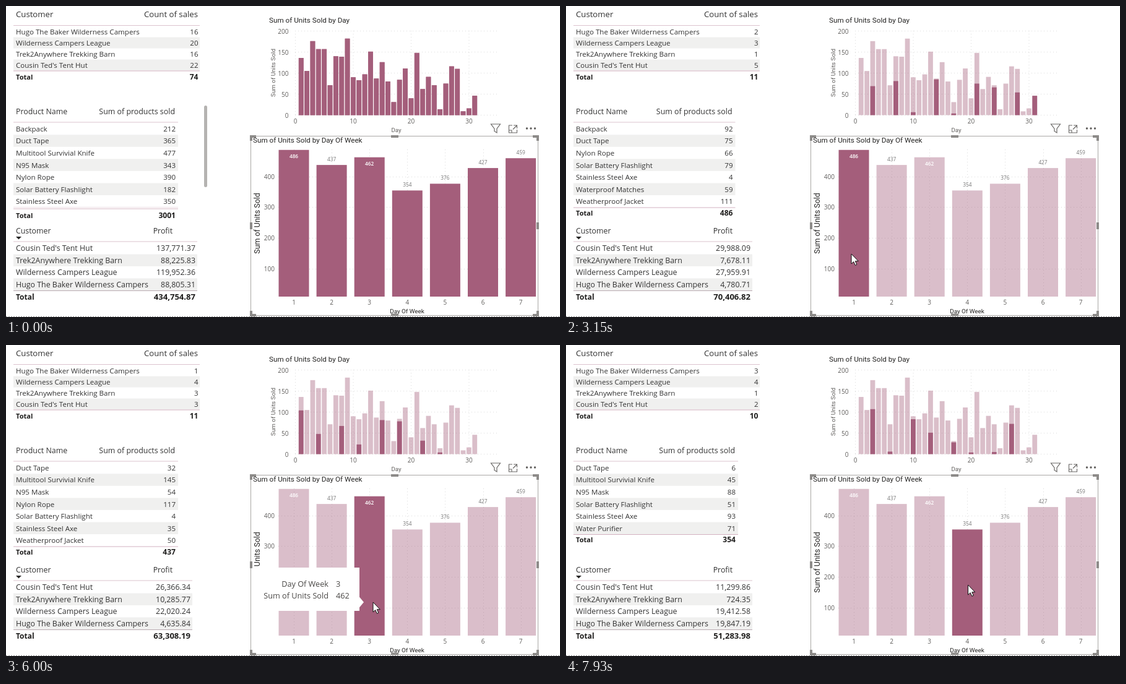
Write an HTML page that moves like this. It is 895 px wide and 503 px high and loops after 8000 ms.

```html
<!DOCTYPE html>
<html lang="en">
<head>
<meta charset="utf-8">
<title>Sales dashboard</title>
<style>
html, body { margin: 0; width: 100%; height: 100%; overflow: hidden; background: #fff; }
svg { display: block; width: 895px; height: 503px; }
text { font-family: "Open Sans", "Noto Sans", sans-serif; fill: #333; white-space: pre; }
.din { font-family: Roboto, Inter, sans-serif; fill: #252423; }
</style>
</head>
<body>
<svg id="stage" viewBox="0 0 895 503"></svg>
<script>
const LOOP = 8000;
const ACCENT = '#a45e7b', GREY = '#8d8b89';
const stage = document.getElementById('stage');

function el(tag, attrs, parent = stage) {
  const node = document.createElementNS('http://www.w3.org/2000/svg', tag);
  for (const key in attrs) node.setAttribute(key, attrs[key]);
  parent.appendChild(node);
  return node;
}
const text = (str, x, y, size, attrs = {}, parent = stage) => {
  const node = el('text', { x, y, 'font-size': size, ...attrs }, parent);
  node.textContent = str;
  return node;
};
const rect = (x, y, width, height, fill, parent, more) =>
  el('rect', { x, y, width, height, fill, ...more }, parent);
const path = (d, attrs, parent) => el('path', { d, fill: 'none', ...attrs }, parent);
const show = (node, on) => node.setAttribute('display', on ? 'inline' : 'none');
const clamp = v => Math.max(0, Math.min(1, v));
const ease = p => p < .5 ? 4 * p ** 3 : 1 - 4 * (1 - p) ** 3;
const END = { 'text-anchor': 'end' }, MID = { 'text-anchor': 'middle' };

// Data: index 0 is the unfiltered view, 1 to 4 the selected weekday
const shops = ['Hugo The Baker Wilderness Campers', 'Wilderness Campers League',
  'Trek2Anywhere Trekking Barn', "Cousin Ted's Tent Hut"];
const sales = [[16, 20, 16, 22, 74], [2, 3, 1, 5, 11], [1, 4, 3, 3, 11], [4, 1, 2, 3, 10], [3, 4, 1, 2, 10]];
const profits = [
  '137,771.37 88,225.83 119,952.36 88,805.31 434,754.87',
  '29,988.09 7,678.11 27,959.91 4,780.71 70,406.82',
  '26,366.34 10,285.77 22,020.24 4,635.84 63,308.19',
  '18,688.23 17,819.01 6,084.54 24,338.16 66,929.94',
  '11,299.86 724.35 19,412.58 19,847.19 51,283.98'
].map(row => row.split(' '));
const goods = {
  B: 'Backpack', D: 'Duct Tape', M: 'Multitool Survivial Knife', N: 'N95 Mask', R: 'Nylon Rope',
  S: 'Solar Battery Flashlight', A: 'Stainless Steel Axe', W: 'Waterproof Matches',
  J: 'Weatherproof Jacket', P: 'Water Purifier'
};
const sold = [
  { B: 212, D: 365, M: 477, N: 343, R: 390, S: 182, A: 350 },
  { B: 92, D: 75, R: 66, S: 79, A: 4, W: 59, J: 111 },
  { D: 32, M: 145, N: 54, R: 117, S: 4, A: 35, J: 50 },
  { B: 61, D: 134, M: 54, N: 70, R: 5, A: 68, P: 70 },
  { D: 6, M: 45, N: 88, S: 51, A: 93, P: 71 }
];
const totals = [3001, 486, 437, 462, 354];
const daily = [136, 105, 176, 157, 157, 71, 140, 139, 182, 90, 83, 97, 151, 87, 126, 80,
  31, 84, 111, 40, 148, 62, 91, 71, 14, 75, 116, 110, 9, 16, 46];
const shares = [
  Object.fromEntries(daily.map((v, i) => [i + 1, v])),
  { 3: 69, 7: 81, 10: 7, 14: 85, 17: 4, 21: 75, 24: 66, 28: 54, 31: 46 },
  { 1: 104, 4: 48, 8: 67, 11: 23, 15: 81, 18: 78, 22: 32, 25: 4 },
  { 2: 37, 5: 70, 9: 115, 12: 56, 16: 67, 19: 70, 23: 42, 26: 5 },
  { 3: 107, 6: 6, 10: 83, 13: 51, 17: 28, 20: 4, 24: 5, 27: 72 }
];
const weekly = [486, 437, 462, 354, 376, 427, 459];

// When each part follows a click
const barTimes = [2300, 4250, 5930, 7515];
const chartTimes = [2570, 4343, 6060, 7635];
const goodsTimes = [2640, 4370, 6130, 7725];
const shopTimes = [2710, 4510, 6200, 7790];
const MORPH = 300;
const stateAt = (times, t) => times.filter(at => t >= at).length;

// Tables
function table(o) {
  const g = el('g', {});
  const n = o.rows.length, foot = o.foot || o.top + n * o.pitch;
  const line = (y, color) => rect(12, y, o.edge - 12, 1, color, g);
  text(o.head[0], 16, o.headY, o.headSize, {}, g);
  text(o.head[1], o.headX, o.headY, o.headSize, END, g);
  o.rows.forEach(([name, value], i) => {
    const y = o.top + i * o.pitch;
    if (i % 2) rect(12, y, o.edge - 12, o.pitch, '#f0f0ef', g);
    text(name, 16, y + o.base, o.size, {}, g);
    text(value, o.right, y + o.base, o.size, END, g);
  });
  line(o.lineY, '#dcc3ce');
  line(foot, o.footColor || '#d3b1c0');
  const bold = { 'font-weight': 700, style: 'fill:#1f1e1d' };
  text('Total', 16, foot + o.totalDy, o.totalSize, bold, g);
  text(o.total, o.right, foot + o.totalDy, o.totalSize * 1.09, { ...bold, ...END }, g);
  return g;
}
const salesTables = sales.map(v => table({
  head: ['Customer', 'Count of sales'], headX: 310, headY: 18, headSize: 13.2, lineY: 31,
  top: 32.5, pitch: 18, base: 13.5, size: 11.57, edge: 313, right: 310.5,
  rows: shops.map((s, i) => [s, v[i]]), total: v[4], totalDy: 14, totalSize: 11.1
}));
const goodsTables = sold.map((list, k) => {
  const shift = k === 1 ? 4.5 : 0;
  const g = table({
    head: ['Product Name', 'Sum of products sold'], headX: 273 - shift, headY: 175, headSize: 12.4, lineY: 187.5,
    top: 188.7, pitch: 19.55, base: 14.2, size: 11.57, edge: 278 - shift, right: 274 - shift,
    rows: Object.entries(list).map(([id, v]) => [goods[id], v]),
    total: totals[k], totalDy: k ? 13 : 15.5, totalSize: 11.1, foot: k ? 0 : 327.5
  });
  if (!k) {
    rect(12, 324.5, 266, 3, '#f6eff2', g);
    rect(320, 161, 5, 132, '#b5b3b1', g, { rx: 2.5 });
  }
  return g;
});
const profitTables = profits.map((v, k) => table({
  head: ['Customer', 'Profit'], headX: 269, headY: 368, headSize: 12.35, lineY: 380.5,
  top: 382, pitch: 19.5, base: 14, size: 12.4, edge: k ? 301 : 309, right: k ? 298 : 306,
  rows: [3, 2, 1, 0].map((s, i) => [shops[s], v[i]]),
  total: v[4], totalDy: 15, totalSize: 12, footColor: '#b9aab1'
}));
path('M16 373h9l-4.500 4.500z', { fill: '#252423' });

// Daily chart
const DOT = { stroke: '#dadada', 'stroke-dasharray': '1 4' };
const soft = 'fill:#605e5c';
const dayX = d => 467.5 + 9.35 * d, dayY = v => 176.500 - .68 * v;
text('Sum of Units Sold by Day', 425, 27, 11.7, { class: 'din' });
for (let v = 0; v <= 200; v += 50) {
  path(`M467 ${dayY(v)}H797`, DOT);
  text(v, 456.5, dayY(v) + 4, 10, { ...END, style: soft });
}
for (let d = 0; d <= 30; d += 10) {
  path(`M${dayX(d)} 40V176`, DOT);
  text(d, dayX(d), 190, 10, { ...MID, style: soft });
}
text('Sum of Units Sold', 0, 0, 9.8, { class: 'din', ...MID, style: soft, transform: 'translate(434.500 108) rotate(-90)' });
text('Day', 630.5, 204, 9.7, { class: 'din', ...MID, style: soft });
const dayBase = el('g', { fill: ACCENT });
daily.forEach((v, i) => el('rect', { x: dayX(i + 1) - 4, y: dayY(v), width: 7.8, height: .68 * v }, dayBase));
const dayBars = daily.map((v, i) => rect(dayX(i + 1) - 4, 0, 7.8, 0, ACCENT));

// Weekday chart
const weekX = i => 465 + 61.1 * i, weekY = v => 474.3 - .497 * v;
text('Sum of Units Sold by Day Of Week', 399, 221, 11.7, { class: 'din' });
for (let v = 100; v <= 400; v += 100) {
  path(`M440 ${Math.round(weekY(v)) + .5}H856`, DOT);
  text(v, 434, weekY(v) + 4, 10, { ...END, style: soft });
}
text('Sum of Units Sold', 0, 0, 12.4, { class: 'din', ...MID, transform: 'translate(410 351.500) rotate(-90)' });
text('Day Of Week', 648, 497, 9.9, { class: 'din', ...MID });
const weekBars = weekly.map((v, i) => {
  const x = weekX(i), y = weekY(v), inside = i === 0 || i === 2;
  path(`M${Math.round(x) + .5} 232V470`, DOT);
  const bar = rect(x - 24.5, y, 49, 470 - y, ACCENT);
  text(v, x, y + (inside ? 13 : -6), 8.3,
    { ...MID, 'font-weight': inside ? 600 : 400, style: `fill:${inside ? '#fff' : '#777'}` });
  text(i + 1, x, 483, 10, { ...MID, style: soft });
  return bar;
});

// Selection frame, toolbar icons, page edge
path('M0 502.500H895', { stroke: '#8a8a8a', 'stroke-dasharray': '2 2' });
rect(395.5, 210.5, 464, 290, 'none', stage, { stroke: '#a9a7a5' });
path('M396 218V211H404M851 211H859V218M859 493V500H851M404 500H396V493' +
  'M622 211H634M622 499.500H634M396 350V361M859 350V361', { stroke: GREY, 'stroke-width': 4 });
path('M783.500 191H798.500L793 198.500V205L789 202.500V198.500Z', { stroke: '#696765', 'stroke-width': 1.2 });
path('M818 193H812.500V205H825.500V200M820 193H825.500V198M825.500 193L819 199.500M812.500 201H817V205',
  { stroke: '#696765', 'stroke-width': 1.1 });
[841.5, 848, 854.5].forEach(cx => el('circle', { cx, cy: 198, r: 1.7, fill: '#605e5c' }));

// Tooltips: position, side of the arrow, visible span
const tips = [
  { x: 487, y: 344, side: -1, from: 2110, to: 2790 },
  { x: 331, y: 362, side: 1, from: 4110, to: 4800 },
  { x: 400, y: 360, side: 1, from: 5800, to: 6520 }
];
tips.forEach((tip, i) => {
  const g = tip.node = el('g', { transform: `translate(${tip.x} ${tip.y})` });
  rect(0, 0, 171, 70, '#fff', g);
  path(tip.side < 0 ? 'M.5 48L-7 57L.5 66Z' : 'M170.500 47L178 56L170.500 65Z', { fill: '#fff' }, g);
  [['Day Of Week', i + 1], ['Sum of Units Sold', weekly[i]]].forEach(([label, value], row) => {
    const y = 31 + 19 * row;
    text(label, 121, y, 12.7, { ...END, style: 'fill:#4a4846' }, g);
    text(value, 133, y, 12.7, { style: 'fill:#4a4846' }, g);
  });
});

// Pointer: time, x, y
const cursor = path('M0 0V16L3.700 12.600L6.300 18.300L8.800 17.200L6.300 11.700H11.300Z',
  { style: 'fill:#fff', stroke: '#111', 'stroke-width': 1 });
const route = [
  [1300, 500, 510], [1760, 460, 401], [3080, 460, 401], [3150, 461, 401], [3780, 524, 419],
  [5100, 524, 419], [5260, 575, 414], [5400, 590, 416], [5540, 593, 416], [6720, 593, 416],
  [7120, 646, 404], [7280, 646, 404], [7340, 647, 400], [7460, 647, 400], [7520, 649.500, 388]
];
function pointer(t) {
  const next = route.findIndex(p => p[0] > t);
  if (next <= 0) return route[next ? route.length - 1 : 0].slice(1);
  const a = route[next - 1], b = route[next];
  const p = (t - a[0]) / (b[0] - a[0]), s = p * p * (3 - 2 * p);
  return [1, 2].map(k => a[k] + (b[k] - a[k]) * s);
}

function draw(t) {
  const swap = (list, times) => list.forEach((g, i) => show(g, i === stateAt(times, t)));
  swap(salesTables, shopTimes);
  swap(profitTables, shopTimes);
  swap(goodsTables, goodsTimes);

  const day = stateAt(barTimes, t);
  weekBars.forEach((bar, i) => bar.setAttribute('fill-opacity', !day || i === day - 1 ? 1 : .4));

  const cur = stateAt(chartTimes, t), prev = Math.max(0, cur - 1);
  const p = cur ? ease(clamp((t - chartTimes[cur - 1]) / MORPH)) : 1;
  dayBase.setAttribute('opacity', cur ? .4 : 1);
  dayBars.forEach((bar, i) => {
    const a = shares[prev][i + 1] || 0, b = shares[cur][i + 1] || 0;
    const v = a + (b - a) * p;
    bar.setAttribute('y', dayY(v));
    bar.setAttribute('height', .68 * v);
  });

  tips.forEach(({ node, from, to }) =>
    node.setAttribute('opacity', Math.min(clamp((t - from + 40) / 140), clamp((to + 110 - t) / 110))));

  const [x, y] = pointer(t);
  show(cursor, t >= 1340);
  cursor.setAttribute('transform', `translate(${x} ${y})`);
}

const start = performance.now();
function tick() {
  draw((performance.now() - start) % LOOP);
  requestAnimationFrame(tick);
}
draw(0);
requestAnimationFrame(tick);
</script>
</body>
</html>
```
